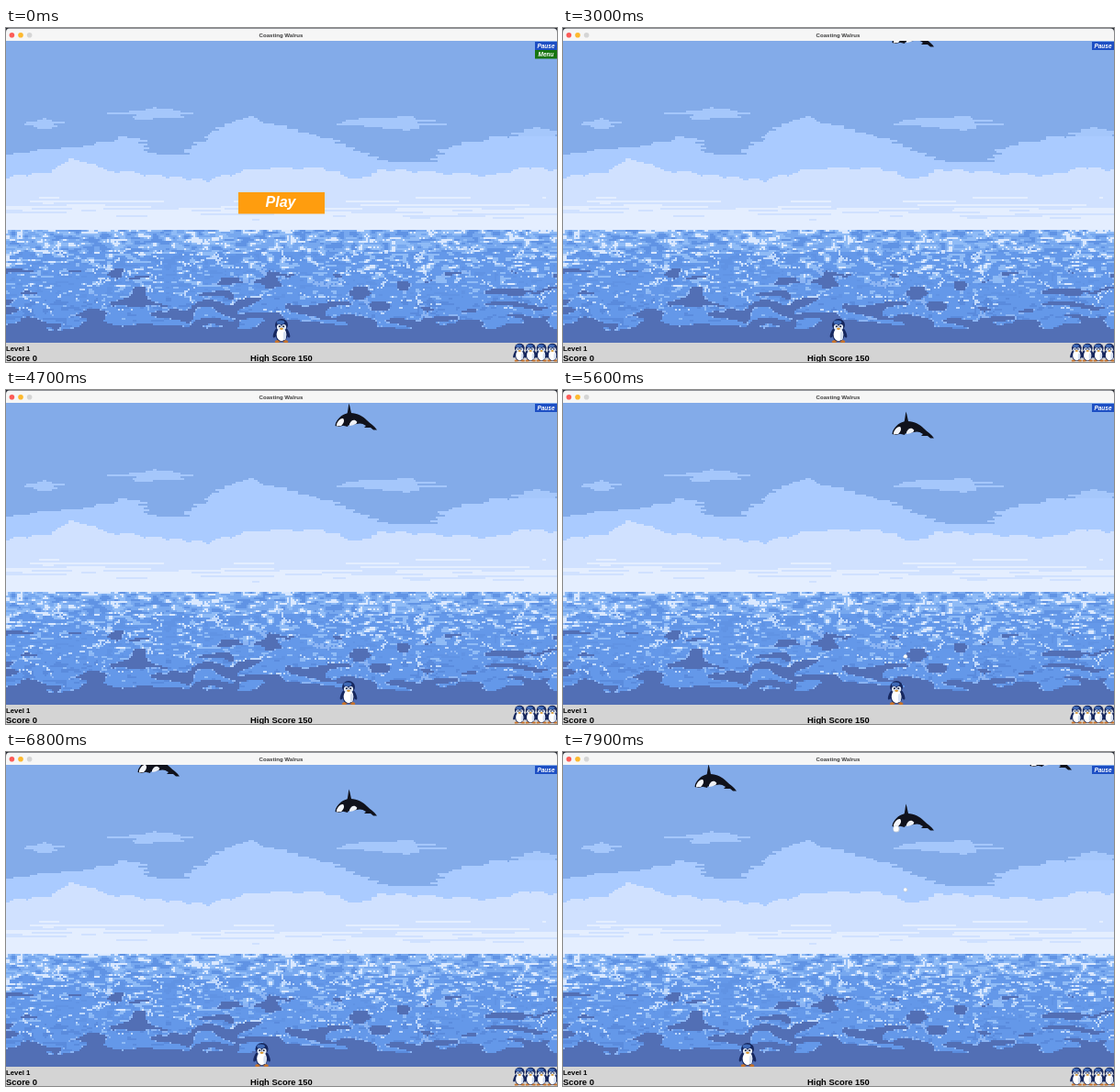
An HTML page with a canvas for the animation above (8000 ms loop, 600 by 364 pixels).

```html
<!DOCTYPE html>
<html lang="en">
<head>
<meta charset="utf-8">
<title>Coasting Walrus</title>
<style>
  html, body { margin: 0; width: 600px; height: 364px; overflow: hidden; background: #83abe9; }
  canvas, svg { position: absolute; left: 0; top: 0; display: block; }
  text { font-family: "Liberation Sans", Arial, sans-serif; font-weight: bold; }
  .btn text { font-style: italic; fill: #fff; text-anchor: middle; }
</style>
</head>
<body>
<canvas id="stage" width="600" height="364"></canvas>
<svg width="600" height="364" viewBox="0 0 600 364">
  <text x="299.5" y="10" font-size="6.1" fill="#3c3c3c" text-anchor="middle">Coasting Walrus</text>
  <text x="0" y="352.3" font-size="7.8">Level 1</text>
  <text x="0" y="363" font-size="9.4">Score 0</text>
  <text x="266" y="363" font-size="9.4">High Score 150</text>
  <g class="btn">
    <rect x="576" y="15" width="24" height="9" fill="#1d4fc4"/>
    <text x="588" y="21.8" font-size="6.5">Pause</text>
  </g>
  <g class="btn" id="menu">
    <rect x="576" y="24" width="24" height="9.5" fill="#177510"/>
    <text x="588" y="31" font-size="6.5">Menu</text>
    <rect x="253" y="179" width="94" height="23.5" fill="#ff9d0e"/>
    <text x="299" y="195" font-size="16">Play</text>
  </g>
</svg>
<script>
const LOOP = 8000, STEP = 100, TOP = 14, HORIZON = 219, FLOOR = 343;
const stage = document.getElementById('stage');
const menu = document.getElementById('menu');
const ctx = stage.getContext('2d');

const mix = (a, b, k) => a + (b - a) * k;

// Linear interpolation through a few [x, y] points
function along(points, x) {
  const i = points.findIndex(p => x <= p[0]);
  if (i === 0) return points[0][1];
  if (i < 0) return points[points.length - 1][1];
  const [a, b] = [points[i - 1], points[i]];
  return mix(a[1], b[1], (x - a[0]) / (b[0] - a[0]));
}

function hash(x, y) {
  const s = Math.sin(x * 127.1 + y * 311.7) * 43758.5453;
  return s - Math.floor(s);
}

function noise(x, y) {
  const i = Math.floor(x), j = Math.floor(y);
  const ease = f => f * f * (3 - 2 * f);
  const u = ease(x - i), v = ease(y - j);
  return mix(mix(hash(i, j), hash(i + 1, j), u),
             mix(hash(i, j + 1), hash(i + 1, j + 1), u), v);
}

const backCloud = [[0, 137], [100, 126], [125, 117], [148, 122], [156, 137], [190, 137], [230, 109],
  [266, 96], [355, 122], [412, 145], [462, 146], [474, 131], [530, 118], [600, 117]];
const frontCloud = [[0, 162], [45, 157], [72, 142], [110, 155], [215, 166], [272, 153], [347, 152],
  [380, 166], [410, 154], [530, 161], [568, 151], [600, 155]];
const wisps = [
  { x: 156, y: 93, w: 48, h: 7 },
  { x: 35, y: 104, w: 29, h: 6 },
  { x: 422, y: 103, w: 62, h: 8 },
  { x: 577, y: 115, w: 30, h: 8 }
];

function inWisp(x, y) {
  return wisps.some(c => {
    const dy = (y - c.y) / c.h;
    if (Math.abs(dy) > 1) return false;
    const reach = c.w * (1 - Math.abs(dy)) * (0.6 + 0.6 * hash(y, c.x));
    const shift = (hash(c.x, y) - 0.5) * c.w * 0.5;
    return Math.abs(x - c.x - shift) < reach;
  });
}

function skyColor(x, y) {
  const rag = (hash(y, 7) - 0.5) * 14;
  const haze = (y - 183) / 30;
  if (haze > 0 && noise(x / 45, y * 1.3) > 0.85 - haze * 0.85) return '#e4eeff';
  const puff = 3 * Math.abs(Math.sin(x / 9 + Math.sin(x / 31)));
  if (y > along(frontCloud, x + rag * 0.3) + 1.5 - puff) return '#d0e1ff';
  if (y > along(backCloud, x + rag) + 1 - puff / 2) return '#aacbff';
  return inWisp(x, y) ? '#a5c7fb' : '#83abe9';
}

function seaColor(x, y) {
  const d = (y - HORIZON) / (FLOOR - HORIZON);
  const grain = hash(x, y);
  const glint = noise(x / 7, y / 2.4);
  const swell = y + 6 * Math.abs(Math.sin(x / 27 + 4 * noise(x / 90, y / 30)));
  const wave = noise(x / 24, swell / 6);
  const crest = Math.abs(noise(x / 36 + 50, swell / 9) - 0.5);

  // Troughs widen downwards until they fill the foreground
  const trough = d < 0.32 ? 0 : 0.12 + 0.65 * (d - 0.32) + Math.max(0, d - 0.8) * 5;
  if (wave < trough) return '#526fb5';
  if (trough && wave < trough + 0.06 && grain > 0.45) return '#8bb4f3';
  if (d > 0.15 && d < 0.75 && crest < 0.035 && grain > 0.5) return '#c0d9fc';
  if (glint > 0.64 + d * 0.55 && grain > 0.25) return '#d9e8ff';
  if (glint > 0.46 + d * 0.6) return '#8fbbf6';
  if (glint < 0.28) return d < 0.6 ? '#6093e4' : '#5a8bdd';
  return d < 0.2 ? '#77a8ef' : '#6498e9';
}

function disc(g, x, y, r, color) {
  oval(g, x, y, r, r, color);
}

function oval(g, x, y, rx, ry, color, turn = 0) {
  g.fillStyle = color;
  g.beginPath();
  g.ellipse(x, y, rx, ry, turn, 0, 7);
  g.fill();
}

function shape(g, d, color) {
  g.fillStyle = color;
  g.fill(new Path2D(d));
}

function penguin(g, x, y, k = 1) {
  g.save();
  g.translate(x, y);
  g.scale(k, k);
  for (const s of [-1, 1]) {
    oval(g, s * 4, 11.4, 3.4, 1.5, '#c9742a', s * 0.15);
    oval(g, s * 6.8, 2.6, 1.7, 5.2, '#16275e', s * -0.35);
  }
  oval(g, 0, 3, 7, 8.8, '#16275e');
  oval(g, 0, -6.3, 7, 6.6, '#16275e');
  oval(g, -1, -9.2, 4.4, 2.2, '#3f69b5');
  oval(g, 0, 4, 5.4, 7.2, '#fff');
  for (const s of [-1, 1]) {
    oval(g, s * 2.6, -4, 2.5, 3, '#e6edf8');
    disc(g, s * 2.2, -4.8, 1, '#111b3c');
  }
  oval(g, 3.4, 5.5, 1.6, 4.8, '#d5e0f2');
  oval(g, 0, -2.2, 2, 1.1, '#d9982f');
  g.restore();
}

function orca(g, x, y) {
  g.save();
  g.translate(x, Math.round(y));
  shape(g, 'M13 14 C14.5 9 14.7 4 15.4 0.5 C17 4 17 9 19 14Z', '#10121c');
  shape(g, 'M1 22 C4 16 9 11 17 11 C25 11 31 15 35 19 C39 23 43 25 46 29.5 L42 29.5 L39 27 L32 27 L34 25 C30 22 27 22 24 23 C16 25 10 24 4 26 L0.5 25Z', '#10121c');
  shape(g, 'M2 23 C4 19 6 16.5 9 17 C11 19 10 22 7 25 L2 25.5Z', '#f4f6fa');
  shape(g, 'M16 23 C18 18 22 17.5 24 20.5 C25 23 20 24.5 16 25Z', '#eef1f7');
  shape(g, 'M10 20 L16 21 L14 26 L10 25Z', '#10121c');
  g.restore();
}

function ball(x, y, r) {
  disc(ctx, x, y, r, '#c3ccd9');
  disc(ctx, x - 0.3, y - 0.3, r * 0.8, '#fff');
}

function paintScene() {
  const scene = document.createElement('canvas');
  scene.width = 600;
  scene.height = 364;
  const g = scene.getContext('2d');
  g.fillStyle = '#2b2f38';
  g.fillRect(0, 0, 600, TOP);
  g.fillStyle = '#f6f6f6';
  g.beginPath();
  g.roundRect(0, 0.4, 600, TOP + 6, 4);
  g.fill();
  for (let y = TOP + 0.5; y < FLOOR; y += 2) {
    for (let x = 0; x < 600; x += 2) {
      g.fillStyle = y < HORIZON ? skyColor(x, y) : seaColor(x, y);
      g.fillRect(x, Math.floor(y), 2, 2);
    }
  }
  ['#fc5b57', '#fdb92e', '#d5d5d5'].forEach((c, i) => disc(g, 6.4 + i * 9.6, 7.8, 2.8, c));
  g.fillStyle = '#d4d4d4';
  g.fillRect(0, FLOOR, 600, 21);
  for (let i = 0; i < 4; i++) penguin(g, 559.3 + i * 11.9, 353.6, 0.77);
  return scene;
}

const scene = paintScene();
const drift = [[2000, -22], [4700, 14], [5600, 23], [7900, 56]];
const slide = [[3300, 300], [4340, 373], [5460, 373], [7900, 201]];
// Left edge of each orca and how far it trails the first
const orcas = [{ x: 358, lag: 0 }, { x: 143, lag: 43 }, { x: 508, lag: 66 }];

function draw(t) {
  ctx.drawImage(scene, 0, 0);
  menu.style.display = t < 2000 ? '' : 'none';
  ctx.save();
  ctx.beginPath();
  ctx.rect(0, TOP, 600, FLOOR - TOP);
  ctx.clip();
  for (const o of orcas) orca(ctx, o.x, along(drift, t) - o.lag);
  if (t >= 5150) ball(373, 318 - (t - 5150) * 0.061, 2.2);
  if (t >= 7800) ball(363, 84, 3.6);
  penguin(ctx, along(slide, t), 330);
  ctx.restore();
}

function tick() {
  const t = performance.now() % LOOP;
  draw(Math.floor(t / STEP) * STEP);
  requestAnimationFrame(tick);
}
tick();
</script>
</body>
</html>
```
